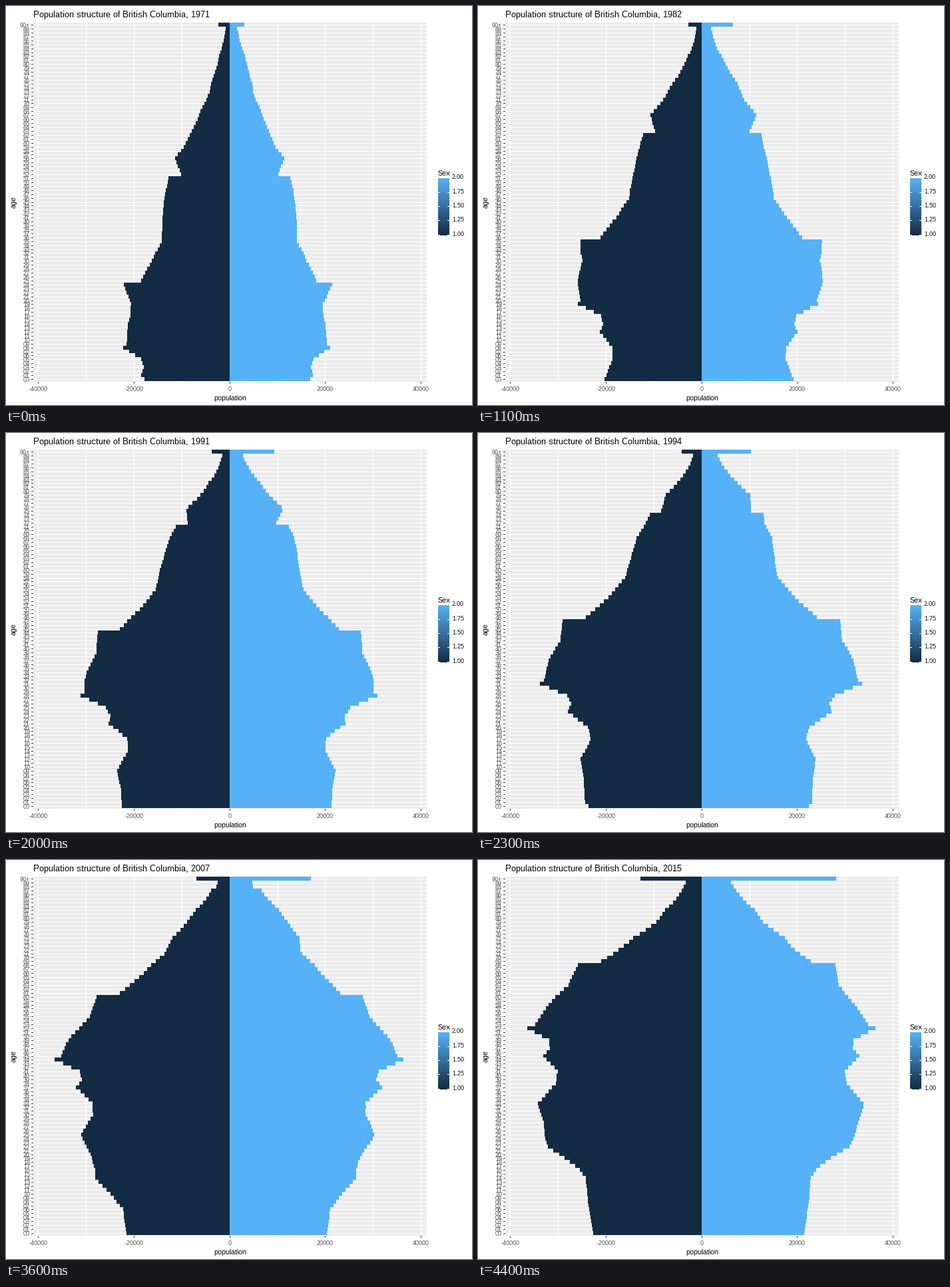
A matplotlib script for the animation above (4500 ms loop, 700 px wide and 600 px high).

```python
import numpy as np
import matplotlib.pyplot as plt
from matplotlib.animation import FuncAnimation
from matplotlib.colors import LinearSegmentedColormap
from matplotlib.patches import Polygon, Rectangle

W, H, DPI = 700, 600, 100
PX = 72 / DPI
plt.rcParams["font.family"] = "Liberation Sans"
plt.rcParams["text.hinting"] = "native"
plt.rcParams["text.hinting_factor"] = 1

MALE, FEMALE = "#132B43", "#56B1F7"
LEFT, RIGHT, TOP, BOTTOM = 41, 632, 25, 565
CENTER, ZERO, PER_10K = 336, 336.15, 71.9
ROW = (BOTTOM - TOP) / 91.2
AGES = np.arange(90)
ROWS = len(AGES) + 1
FIRST, LAST = 1971, 2015


def curve(*points):
    """Piecewise linear function through a few key points."""
    xs, ys = zip(*points)
    return lambda x: np.interp(x, xs, ys)


# Full size of a cohort (px) by year of birth
cohort = curve(
    (1882, 30), (1898, 41), (1905, 57), (1912, 77), (1915, 91), (1919, 80),
    (1920, 100), (1926, 108), (1936, 118), (1941, 142), (1946, 174),
    (1947, 210), (1952, 217), (1957, 242), (1962, 259), (1963, 270),
    (1966, 234), (1968, 233), (1970, 246), (1974, 226), (1977, 234),
    (1982, 272), (1987, 280), (1993, 300), (1998, 272), (2001, 260),
    (2015, 288))

# Log share of a cohort present: arrivals when young, deaths when old
presence = curve(
    (0, -0.55), (8, -0.445), (16, -0.36), (24, -0.20), (32, -0.09),
    (40, -0.03), (48, 0), (60, -0.035), (68, -0.10), (75, -0.27),
    (82, -0.72), (89, -1.5))

# Migration tide by calendar year, also as a log share
tide = curve((1971, -0.08), (1977, -0.05), (1987, -0.10), (1994, 0),
             (2015, -0.02))

women_per_man = curve((0, 0.945), (18, 0.94), (28, 0.99), (60, 1),
                      (72, 1.12), (82, 1.45), (89, 1.85))

oldest_men = curve((1971, 17), (1987, 22), (2001, 38), (2007, 50), (2015, 92))
oldest_women = curve((1971, 22), (1987, 58), (2001, 89), (2007, 122),
                     (2015, 202))


def men(year):
    size = cohort(year - AGES) * np.exp(presence(AGES) + tide(year))
    return np.append(size, oldest_men(year))


def women(year):
    size = men(year)[:-1] * women_per_man(AGES)
    return np.append(size, oldest_women(year))


fig = plt.figure(figsize=(W / DPI, H / DPI), dpi=DPI, facecolor="white")
ax = fig.add_axes([0, 0, 1, 1])
ax.axis("off")


def text(x, y, s, size, color="black", **kw):
    return ax.text(x, y, s, fontsize=size * PX, color=color, **kw)


def box(x, y, w, h, color, z=1):
    ax.add_patch(Rectangle((x, y), w, h, fc=color, lw=0, aa=False, zorder=z))


# Panel, grid and axes
box(LEFT, TOP, RIGHT - LEFT, BOTTOM - TOP, "#EBEBEB")
for k in range(-4, 5):
    x = int(ZERO + k * PER_10K)
    box(x, TOP, 1, BOTTOM - TOP, "white")
    if k % 2 == 0:
        box(x, BOTTOM, 1, 3, "#333333")
        text(x + 0.5, 579, str(k * 10000), 9, "#4D4D4D", ha="center")
for row in range(ROWS):
    mid = BOTTOM - (row + 0.6) * ROW
    box(LEFT, int(mid), RIGHT - LEFT, 1, "white")
    box(LEFT - 3, int(mid), 3, 1, "#333333")
    label = f"{row:02d}" if row < 90 else "90+"
    text(36, int(mid) + 4, label, 9, "#4D4D4D", ha="right")

title = text(41, 17, "", 13)
text(336.5, 593, "population", 11, ha="center")
text(12, 295, "age", 11, ha="center", va="center", rotation=90)

# Colour bar
text(649, 255, "Sex", 11)
ramp = LinearSegmentedColormap.from_list("sex", [FEMALE, MALE])
ax.imshow(np.linspace(0, 1, 86)[:, None], cmap=ramp, aspect="auto",
          extent=(649, 666, 345, 259), interpolation="nearest", zorder=2)
for i in range(5):
    y = round(258.5 + i * 21.25)
    for x in (649, 663):
        box(x, y, 3, 1, "white", 3)
    text(670, y + 2, f"{2 - i / 4:.2f}", 9)

ax.set_xlim(0, W)
ax.set_ylim(H, 0)

# Pyramid halves as stepped outlines
edges = np.floor(BOTTOM - (np.arange(ROWS + 1) + 0.1) * ROW)
steps = np.repeat(edges, 2)[1:-1]


def outline(widths, side):
    x = CENTER + side * np.repeat(np.round(widths), 2)
    ends = [(CENTER, steps[-1]), (CENTER, steps[0])]
    return np.vstack([np.column_stack([x, steps]), ends])


halves = []
for people, side, color in ((men, -1, MALE), (women, 1, FEMALE)):
    shape = Polygon(outline(people(FIRST), side), fc=color, lw=0, aa=False,
                    zorder=4)
    ax.add_patch(shape)
    halves.append((shape, people, side))


def draw(i):
    year = FIRST + i
    title.set_text(f"Population structure of British Columbia, {year}")
    for shape, people, side in halves:
        shape.set_xy(outline(people(year), side))
    return [title] + [half[0] for half in halves]


anim = FuncAnimation(fig, draw, frames=LAST - FIRST + 1, interval=100,
                     repeat=True, repeat_delay=0, blit=False)
plt.show()
```
